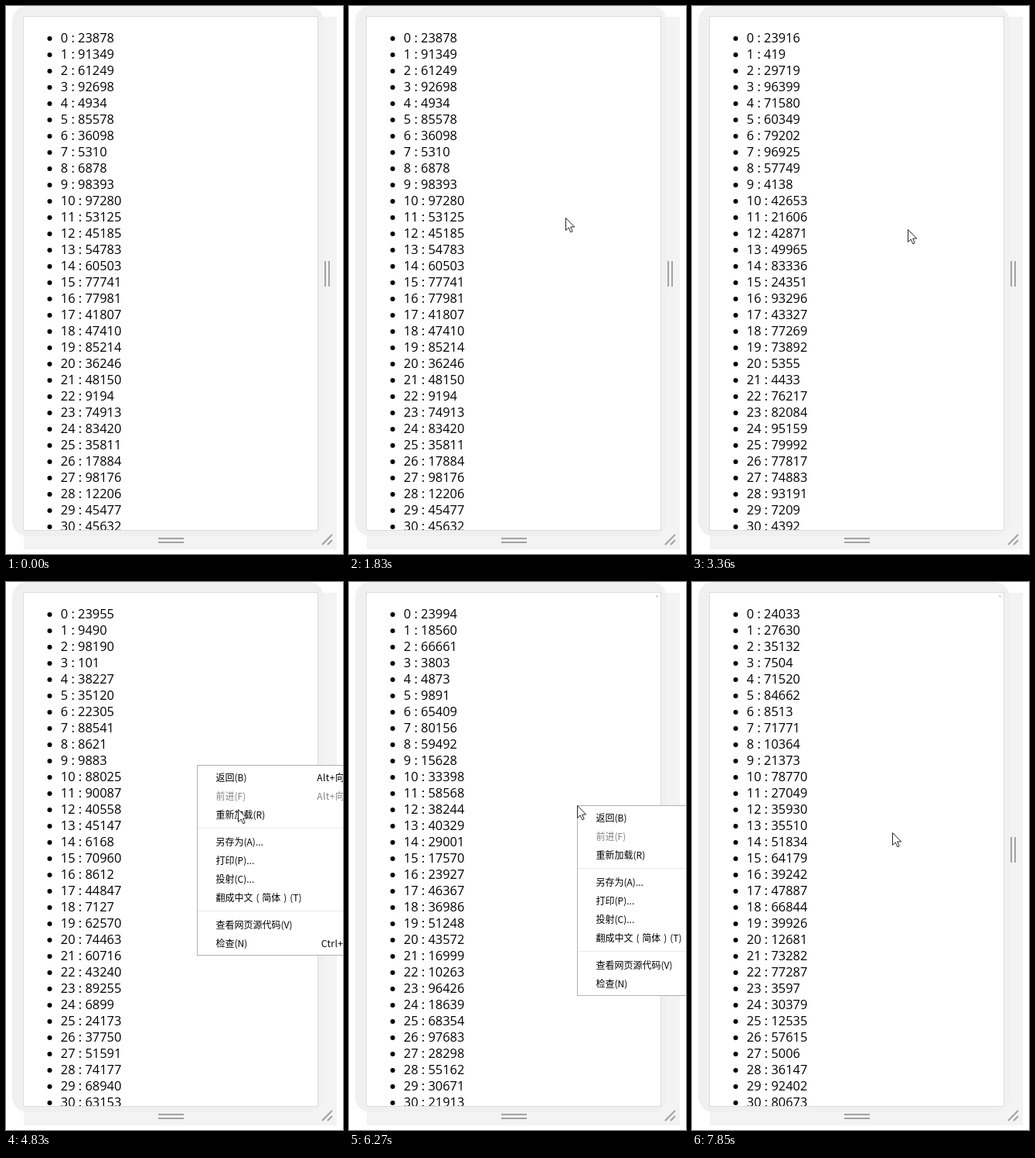
An HTML page that plays this animation: 436 by 707 pixels, repeating every 8 s.

```html
<!DOCTYPE html>
<html lang="zh">
<head>
<meta charset="utf-8">
<style>
  html, body { margin: 0; width: 100%; height: 100%; overflow: hidden; background: #fff; }
  svg { display: block; }
  #list { font: 16.4px "Open Sans", "Noto Sans", sans-serif; }
  #menu { font: 12px "Noto Sans CJK SC", "Noto Sans CJK", sans-serif; word-spacing: 1.2px; }
  .key { text-anchor: end; letter-spacing: .4px; }
  .off { fill: #848484; }
</style>
</head>
<body>
<svg width="436" height="707" viewBox="0 0 436 707">
  <clipPath id="screen"><rect x="23" y="14" width="380" height="662"/></clipPath>
  <path d="M404 14H428V701H23V677H404Z" fill="#f3f3f3"/>
  <rect x="8" width="403" height="684" rx="20" fill="#f0f0f0"/>
  <rect x="22.5" y="13.5" width="381" height="663" fill="#fff" stroke="#dcdcdc"/>
  <path d="M413 329V362M418 329V362M197 687H230M197 692H230M409 695L422 682M416 695L422 689"
        fill="none" stroke="#a2a2a2" stroke-width="2"/>
  <circle id="dot" cx="398.5" cy="18.5" r="1.7" fill="#d8d8d8"/>
  <g id="list" clip-path="url(#screen)"></g>
  <g id="menu"><rect x=".5" y=".5" width="270" height="245" fill="#fff" stroke="#b0b0b0"/>
    <path d="M1 81.5H270M1 188.5H270" stroke="#e9e9e9"/></g>
  <path id="cursor" d="M.5 .5V16.5L4.2 13L6.8 18.8L9.2 17.7L6.7 12H11.7Z" fill="#fff" stroke="#23232f"/>
</svg>
<script>
const LOOP = 8000, STEP = 140, ROWS = 31, ROW = 21;
const $ = id => document.getElementById(id);

// Each visit: the cursor arrives, opens the menu, picks "reload", the menu closes, the list reloads.
const visits = [
  { arrive: 450, at: [209, 211], open: 980, pick: 1710, item: [280, 273], close: 1830, reload: 2100 },
  { arrive: 2220, at: [220, 229], open: 2500, pick: 3080, item: [279, 288], close: 3360, reload: 3670 },
  { arrive: 3820, at: [247, 236], open: 4260, pick: 4830, item: [300, 293], close: 4950, reload: 5870 },
  { arrive: 5560, at: [295, 288], open: 6270, pick: 6810, item: [350, 346], close: 6960, reload: 7240 }
];
const enter = { time: 150, at: [341, 251] };
const leave = { time: 7850, at: [259, 323] };

const moves = [
  ...visits.flatMap(v => [
    { end: v.arrive, steps: 2, to: v.at },
    { end: v.pick, steps: 4, to: v.item }
  ]),
  { end: leave.time, steps: 4, to: leave.at }
];
const dotTimes = [...visits.slice(1).map(v => v.open), leave.time];

const groups = [
  [21, [["返回(B)", "Alt+向左箭头"], ["前进(F)", "Alt+向右箭头", "off"], ["重新加载(R)", "Ctrl+R"]]],
  [104, [["另存为(A)...", "Ctrl+S"], ["打印(P)...", "Ctrl+P"], ["投射(C)..."], ["翻成中文 ( 简体 ) (T)"]]],
  [211, [["查看网页源代码(V)", "Ctrl+U"], ["检查(N)", "Ctrl+Shift+I"]]]
];

function add(parent, tag, attrs, text = "") {
  const node = document.createElementNS("http://www.w3.org/2000/svg", tag);
  for (const name in attrs) node.setAttribute(name, attrs[name]);
  node.textContent = text;
  return parent.appendChild(node);
}

const rows = Array.from({ length: ROWS }, (_, i) => {
  add($("list"), "circle", { cx: 56.5, cy: 42 + i * ROW, r: 3 });
  return add($("list"), "text", { x: 70.8, y: 47 + i * ROW });
});
for (const [top, items] of groups) {
  items.forEach(([label, key = "", state = ""], i) => {
    const y = top + i * 24;
    add($("menu"), "text", { x: 24.5, y, class: state }, label);
    add($("menu"), "text", { x: 228.4, y, class: "key " + state }, key);
  });
}

const show = (node, on) => node.setAttribute("visibility", on ? "visible" : "hidden");
const place = (node, x, y) => node.setAttribute("transform", `translate(${x} ${y})`);

function seeded(seed) {
  return () => (seed = (seed * 1664525 + 1013904223) % 2 ** 32) / 2 ** 32;
}

function fillList(page) {
  const random = seeded(page + 7);
  rows.forEach((row, i) => row.textContent = `${i} : ${Math.floor(random() * 1e5)}`);
}

// The cursor jumps in even steps and reaches its goal on the last one.
function cursorAt(t) {
  let [x, y] = enter.at;
  for (const { end, steps, to } of moves) {
    const step = Math.floor((t - end) / STEP) + steps;
    const p = Math.max(0, Math.min(1, step / steps));
    x += (to[0] - x) * p;
    y += (to[1] - y) * p;
  }
  return [Math.round(x), Math.round(y)];
}

let shownPage;
function draw(t) {
  const page = visits.filter(v => t >= v.reload).length;
  if (page !== shownPage) fillList(shownPage = page);

  const visit = visits.find(v => t >= v.open && t < v.close);
  show($("menu"), visit);
  if (visit) place($("menu"), ...visit.at);

  show($("dot"), dotTimes.some(time => t >= time && t < time + STEP));
  show($("cursor"), t >= enter.time);
  place($("cursor"), ...cursorAt(t));
}

function tick() {
  draw(performance.now() % LOOP);
  requestAnimationFrame(tick);
}
tick();
</script>
</body>
</html>
```
